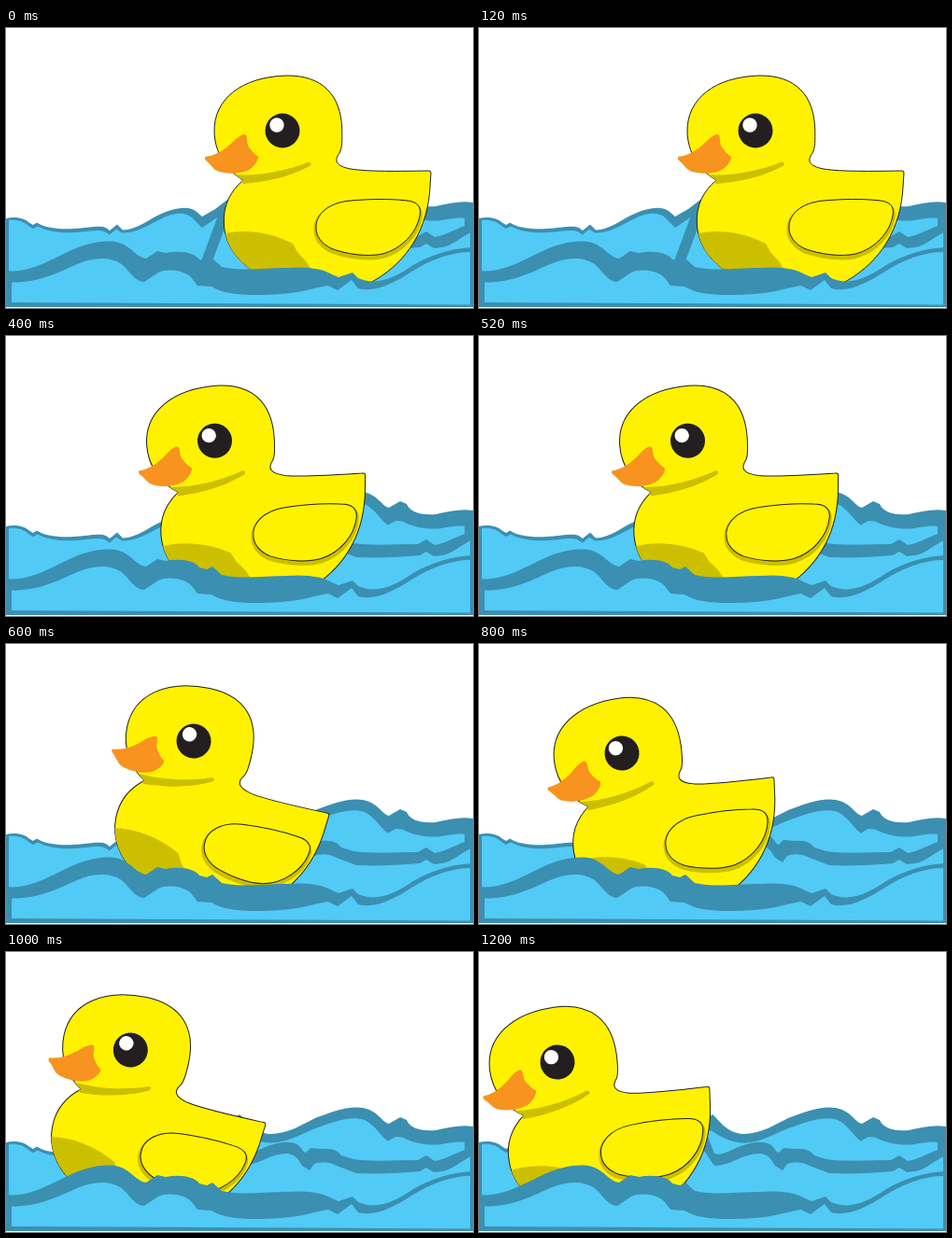
An HTML page for the animation above (1.4 s loop, 500 by 300 pixels).

```html
<!DOCTYPE html>
<html lang="en">
<head>
<meta charset="utf-8">
<title>Rubber duck on waves</title>
<style>
  html, body { margin: 0; width: 100%; height: 100%; overflow: hidden; background: #fff; }
  svg { display: block; width: 100%; height: 100%; }
  .deep { fill: #3b8fb0; }
  .water { fill: #52caf6; }
  .body { fill: #fff200; stroke: #231f20; }
  .shade { fill: #ccbf00; }
  .beak { fill: #f7931e; }
  .eye { fill: #231f20; }
</style>
</head>
<body>
<svg viewBox="0 0 500 300">
  <defs>
    <path id="wing" d="M332 214.500C331 200 345 187.500 367 185.200C389 183 411 183 427 184.700C440 185.500 445 191 443 201C440 219 424 236.500 403 242C388 245.500 365 242.500 349 236.500C338 231.500 332 223 332 214.500Z"/>
    <path id="torso" d="M254 163C240 175 232.500 190 233.300 209C234 230 246 249 266 261C298 288 350 293 388 274C425 255 449 222 453.500 177L455 155Q455 152.500 451.500 153C420 153.500 388 154 369 151C353 148 351 142 357 134C360 129 360 120 359.700 108C358.500 72 339 50.500 300 51C252 52.500 222.500 76 223 111C223.500 133 235 152 254 163Z"/>
    <clipPath id="inside"><use href="#torso"/></clipPath>
  </defs>

  <!-- back wave -->
  <path class="deep" d="M0 204C8 202 19 203 24 208L29 211L33 208.500C41 214 56 216 72 215C88 214 101 211 107 214L111 217L119 210.500L125 216.500C139 216 150 207.500 161 201.500C176 194 193 189 203 196L210 202L224 194L250 174C257 180 265 194 283 195C301 195 317 185 331 178C350 171 372 162 389 169C400 174 404 183 410 184L422 177L429 180C433 190 447 192 460 191C474 188 487 185 500 187V299H0Z"/>
  <path class="water" d="M3 206C11 205 19 207 24 212L29 215L34 212.500C44 218 58 220 74 219C90 218 101 215 107 219L111 221.500L118 215.500L124 219.500C140 219.500 152 211.500 164 205.500C178 198 192 196 200 204L210 214L232 199L248 191C258 197 268 204.500 285 204.500C302 204 320 193 334 188C352 181 371 175 384 180C396 186 403 200 409 202.500L417 198L424 198.500C436 205 453 208 466 206C477 204 485 203 491 204V213L497 211V296H3Z"/>

  <!-- middle wave -->
  <path class="deep" d="M207 255L231 190L240 185L252 216C260 219 270 212 280 208C294 203 306 202 313 207C317 210 317 214 321 215L326 210L338 211C350 210 355 213 359 218L372 222C392 225 420 223 441 223L450 218L459 224C472 222 482 214 498 210V219C488 223 479 233 467 235L458 236L450 231L443 235C421 237 395 238 375 237L354 229C344 224 336 225 330 227L325 234L317 229C312 221 309 216 300 216C283 216 269 229 252 229L237 207L219 255Z"/>

  <g id="duck">
    <use href="#torso" class="body"/>
    <g clip-path="url(#inside)" class="shade">
      <path d="M230 221C253 215 282 218 307 231L312 240L322 251L333 270L300 300H225Z"/>
      <path d="M244 157C270 159 301 153 324 143.500Q328 144 326 147.500C303 160 278 165 254 167Z"/>
    </g>
    <use href="#wing" class="shade" stroke="#ccbf00" stroke-width="5" y="2.500"/>
    <use href="#wing" class="body"/>
    <path class="beak" d="M213 138C229 136 239 126 246 119Q255 112 257 115C259 120 257 124 261 129Q265 135 270 138C270 143 265 149 260 152C250 157 233 157 224 152C220 148 216 143 213 141Z"/>
    <circle class="eye" cx="296" cy="110" r="18.500"/>
    <circle fill="#fff" cx="290" cy="104" r="7.700"/>
  </g>

  <!-- front wave -->
  <path class="deep" d="M0 260C25 263 46 249 66 240C84 231 106 226 121 230C134 234 140 246 150 247L162 239L171 241C188 238 202 241 207 248L215 250L221 247L231 256C253 261 276 257 300 257C322 255 340 258 349 264L356 267L371 262L377 268C397 277 417 267 436 254C455 243 477 236 500 235V299L0 298Z"/>
  <path class="water" d="M6 272.500C35 273 56 262 76 253C94 245 112 245 123 252.500C133 260 136 271 148 272L163 262C174 257 192 260 199 268L205 276L220 277C235 287 264 287 294 285C317 284 334 277 345 276L355 281L370 270L377 279C397 284 417 272 436 260C455 248 477 240 497 240V296.500L6 294Z"/>
</svg>
<script>
// Each pose: eye x, eye y, tilt in degrees
const poses = [
  [296, 110, 0], [277.5, 103, 11], [223.5, 112.3, -3], [201, 104, 13],
  [153, 117, -6.2], [133.3, 105, 13.2], [84, 118, -6]
];
const duck = document.getElementById('duck');
const HOLD = 200;

function draw(time) {
  const [x, y, tilt] = poses[Math.floor(time / HOLD) % poses.length];
  duck.setAttribute('transform', `translate(${x} ${y}) rotate(${tilt}) translate(-296 -110)`);
}

function tick() {
  draw(performance.now());
  requestAnimationFrame(tick);
}
tick();
</script>
</body>
</html>
```
